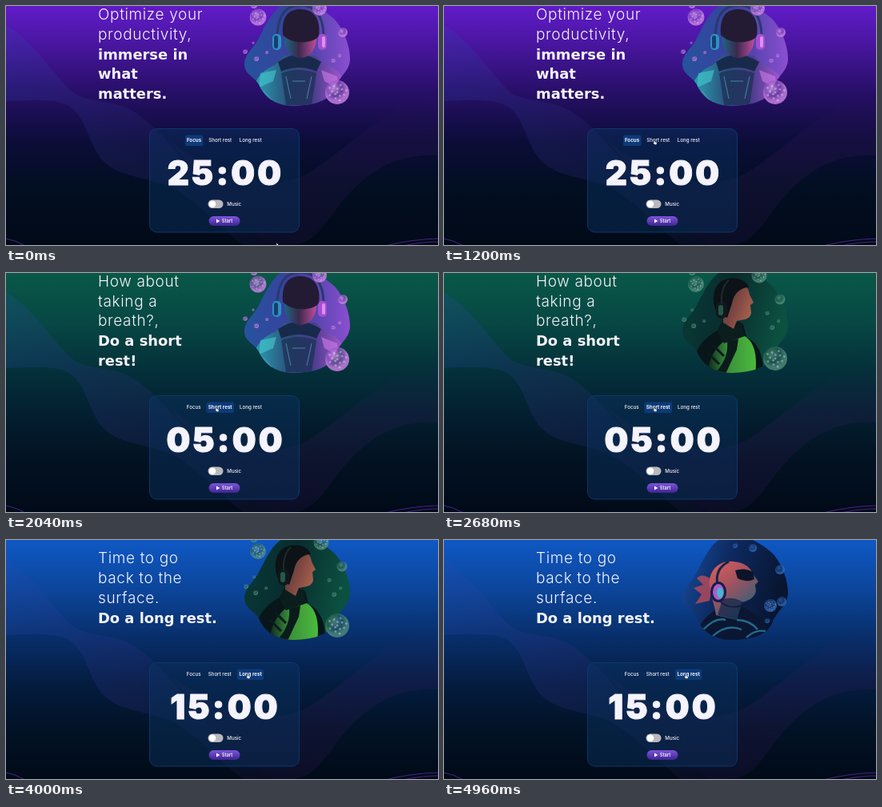
Write an HTML page that moves like this. It is 540 px wide and 299 px high and loops after 5 s.

```html
<!DOCTYPE html>
<html lang="en">
<head>
<meta charset="utf-8">
<title>Focus timer</title>
<style>
  html, body { margin: 0; width: 100%; height: 100%; overflow: hidden; background: #010a18; }
  svg { display: block; width: 540px; height: 299px; }
  text { fill: #f5f3fb; font-family: Inter, sans-serif; font-size: 6.2px; font-weight: 500; }
  .head text { font-size: 19px; font-weight: 300; letter-spacing: .65px; }
  .head .b { font: 700 17.9px "DejaVu Sans", sans-serif; letter-spacing: 0; }
  .mid .time { font: 900 42px Inter, sans-serif; letter-spacing: 3.2px; stroke: #f5f3fb; stroke-width: 1px; }
  .mid { text-anchor: middle; }
  .mid .on { font-weight: 700; }

  /* hard switches between the three modes; pictures follow a little later */
  .focus, .short, .long, .pic1, .pic2, .pic3 { animation: 5s step-end infinite; }
  .focus { animation-name: focus; }
  .short { animation-name: short; }
  .long { animation-name: long; }
  .pic1 { animation-name: pic1; }
  .pic2 { animation-name: pic2; }
  .pic3 { animation-name: pic3; }
  @keyframes focus { 0% { visibility: visible } 36.8%, 100% { visibility: hidden } }
  @keyframes short { 0% { visibility: hidden } 36.8% { visibility: visible } 79.2%, 100% { visibility: hidden } }
  @keyframes long { 0% { visibility: hidden } 79.2%, 100% { visibility: visible } }
  @keyframes pic1 { 0% { visibility: visible } 42.4%, 100% { visibility: hidden } }
  @keyframes pic2 { 0% { visibility: hidden } 42.4% { visibility: visible } 84.8%, 100% { visibility: hidden } }
  @keyframes pic3 { 0% { visibility: hidden } 84.8%, 100% { visibility: visible } }

  .cursor { animation: move 5s infinite ease-in-out; }
  @keyframes move {
    0%, 1% { transform: translate(338px, 296px) }
    12.8%, 15% { transform: translate(257px, 164px) }
    22%, 60% { transform: translate(262px, 168px) }
    68%, 70% { transform: translate(297px, 168px) }
    75%, 100% { transform: translate(301px, 168px) }
  }
  .arrow { animation: arrow 5s step-end infinite; }
  .hand { animation: hand 5s step-end infinite; }
  @keyframes arrow { 0% { visibility: visible } 12% { visibility: hidden } 62% { visibility: visible } 66%, 100% { visibility: hidden } }
  @keyframes hand { 0% { visibility: hidden } 12% { visibility: visible } 62% { visibility: hidden } 66%, 100% { visibility: visible } }
</style>
</head>
<body>
<svg viewBox="0 0 540 299">
  <defs>
    <linearGradient id="purple" x2="0" y2="1">
      <stop stop-color="#611bc8"/><stop offset=".15" stop-color="#4a16a2"/>
      <stop offset=".36" stop-color="#270f67"/><stop offset=".57" stop-color="#0b0d38"/>
      <stop offset=".75" stop-color="#020e22"/><stop offset="1" stop-color="#010a18"/>
    </linearGradient>
    <linearGradient id="green" x2="0" y2="1">
      <stop stop-color="#095848"/><stop offset=".2" stop-color="#074844"/>
      <stop offset=".4" stop-color="#04313b"/><stop offset=".6" stop-color="#031e2f"/>
      <stop offset=".8" stop-color="#021121"/><stop offset="1" stop-color="#010a18"/>
    </linearGradient>
    <linearGradient id="blue" x2="0" y2="1">
      <stop stop-color="#0f58c4"/><stop offset=".2" stop-color="#0c469c"/>
      <stop offset=".4" stop-color="#082f6c"/><stop offset=".6" stop-color="#041c40"/>
      <stop offset=".8" stop-color="#021225"/><stop offset="1" stop-color="#010a18"/>
    </linearGradient>
    <linearGradient id="wave">
      <stop stop-color="#2a4cb0" stop-opacity=".2"/><stop offset=".4" stop-color="#34348c" stop-opacity=".22"/>
      <stop offset="1" stop-color="#3a2a78" stop-opacity=".1"/>
    </linearGradient>
    <linearGradient id="haze" x2="0" y2="1">
      <stop stop-color="#5a1e78" stop-opacity="0"/><stop offset=".4" stop-color="#5a1e78" stop-opacity=".14"/>
      <stop offset="1" stop-color="#401e70" stop-opacity=".16"/>
    </linearGradient>
    <linearGradient id="card" x2="0" y2="1"><stop stop-color="#0a3566" stop-opacity=".42"/><stop offset="1" stop-color="#0a3260" stop-opacity=".45"/></linearGradient>
    <linearGradient id="btn" x2="0" y2="1"><stop stop-color="#7d55dc"/><stop offset="1" stop-color="#3f2492"/></linearGradient>
    <linearGradient id="blob1"><stop stop-color="#25539c"/><stop offset=".5" stop-color="#3c3f9f"/><stop offset="1" stop-color="#8b4fd0"/></linearGradient>
    <linearGradient id="blob2" y2=".2"><stop stop-color="#093a36"/><stop offset=".5" stop-color="#082c2e"/><stop offset="1" stop-color="#0c5040"/></linearGradient>
    <linearGradient id="blob3" y2=".3"><stop stop-color="#174f9f"/><stop offset=".45" stop-color="#0e2a62"/><stop offset="1" stop-color="#081530"/></linearGradient>
    <linearGradient id="jacket"><stop stop-color="#2ba5b4"/><stop offset=".4" stop-color="#2a4c78"/><stop offset=".65" stop-color="#4c3d8e"/><stop offset="1" stop-color="#b25bd8"/></linearGradient>
    <linearGradient id="nape"><stop stop-color="#1f6482"/><stop offset=".45" stop-color="#3a294c"/><stop offset="1" stop-color="#c04c9a"/></linearGradient>
    <linearGradient id="skin2" y2=".6"><stop stop-color="#2a4a34"/><stop offset=".5" stop-color="#7c4540"/><stop offset="1" stop-color="#a8624e"/></linearGradient>
    <linearGradient id="suit2"><stop stop-color="#0e2a20"/><stop offset=".4" stop-color="#3a8f3a"/><stop offset="1" stop-color="#4bbb3c"/></linearGradient>
    <linearGradient id="skin3" x2=".7" y2="1"><stop stop-color="#e0605e"/><stop offset=".45" stop-color="#a4525e"/><stop offset="1" stop-color="#23617c"/></linearGradient>
    <radialGradient id="bub1" cx=".4" cy=".35"><stop stop-color="#d8a0ea" stop-opacity=".75"/><stop offset=".6" stop-color="#9357c8" stop-opacity=".65"/><stop offset="1" stop-color="#c47fe0" stop-opacity=".85"/></radialGradient>
    <radialGradient id="bub2" cx=".4" cy=".35"><stop stop-color="#7fb09c" stop-opacity=".5"/><stop offset=".6" stop-color="#2a6458" stop-opacity=".6"/><stop offset="1" stop-color="#55917f" stop-opacity=".75"/></radialGradient>
    <radialGradient id="bub3" cx=".4" cy=".35"><stop stop-color="#4c86d6" stop-opacity=".5"/><stop offset=".6" stop-color="#174893" stop-opacity=".6"/><stop offset="1" stop-color="#316fc0" stop-opacity=".75"/></radialGradient>
    <path id="blob" d="M298 74C297 62 308 54 314 44C324 26 332 4 350-4C376-10 396 4 411 17C424 32 430 52 430 66C430 82 416 88 410 104C404 121 376 125 358 125C334 124 322 112 316 98C310 88 299 86 298 74Z"/>
    <clipPath id="cut"><use href="#blob"/></clipPath>
  </defs>

  <rect class="focus" width="540" height="299" fill="url(#purple)"/>
  <rect class="short" width="540" height="299" fill="url(#green)"/>
  <rect class="long" width="540" height="299" fill="url(#blue)"/>

  <path fill="url(#wave)" d="M0 24C34 44 58 84 82 107C104 124 140 114 168 138C208 168 236 216 270 246C290 266 306 286 334 299H296C268 278 240 244 206 226C168 212 138 214 118 190C102 168 100 140 80 126C66 116 36 117 0 119Z"/>
  <path fill="url(#haze)" d="M200 165C260 216 330 236 380 208C430 176 480 120 540 112V187C490 184 456 204 424 240C400 268 388 299 356 299H334C306 286 290 266 270 246C246 226 226 192 200 165Z"/>
  <g fill="none" stroke="#5a2aa4" stroke-width=".8">
    <path d="M0 291Q12 293 24 300M474 300Q506 292 540 291M496 300Q520 295 540 295"/>
  </g>

  <g class="pic1">
    <use href="#blob" fill="url(#blob1)"/>
    <g clip-path="url(#cut)">
      <path fill="url(#jacket)" d="M308 124C306 98 316 82 336 74L348 62H388L400 74C420 80 428 98 427 124Z"/>
      <path fill="#182a4c" d="M340 70Q366 52 394 70L388 82Q366 72 344 82Z"/>
      <path fill="#1c3156" fill-opacity=".75" d="M344 84Q366 76 388 84L382 124H350Z"/>
      <path fill="#42c5cd" fill-opacity=".65" d="M318 84L338 80L334 94L316 102Z"/>
      <path fill="#cf7bea" fill-opacity=".6" d="M394 80L414 88L416 104L398 94Z"/>
      <path fill="none" stroke="#67b4d6" stroke-opacity=".6" d="M350 88L356 116M382 88L376 116M358 94H374M322 106L334 120M410 106L398 120"/>
      <ellipse cx="368" cy="41" rx="20" ry="24" fill="url(#nape)"/>
      <path fill="#231b33" d="M346 36C344 12 354 4 368 4C384 4 394 15 391 38C382 48 356 48 346 36Z"/>
    </g>
    <path fill="none" stroke="#29396c" stroke-width="3" d="M339 38C340 8 352-1 368-1C386-1 396 12 397 36"/>
    <rect x="333" y="35" width="11" height="20" rx="5" fill="#2f8fc4"/>
    <rect x="335" y="37" width="5" height="16" rx="2.5" fill="#173e70"/>
    <rect x="390" y="35" width="11" height="20" rx="5" fill="#a24fd0"/>
    <rect x="395" y="38" width="4" height="14" rx="2" fill="#e08cf0"/>
  </g>

  <g class="pic2">
    <use href="#blob" fill="url(#blob2)"/>
    <g clip-path="url(#cut)">
      <path fill="#081619" d="M312 126C310 100 320 84 342 72L350 56L374 64L378 80C394 88 400 106 399 126Z"/>
      <path fill="url(#suit2)" d="M330 126C330 108 340 92 352 84L374 78C388 84 392 104 389 126Z"/>
      <path fill="#0a1c1a" d="M354 86L368 82L366 96L352 126H338Q356 108 354 86Z"/>
      <path fill="none" stroke="#0a1c1a" stroke-width="3" d="M336 90L350 104M330 100L344 114"/>
      <path fill="#0b1d1d" d="M350 56L372 62L376 79L350 88L342 74Z"/>
      <path fill="url(#skin2)" d="M358 14C370 8 381 16 382 27L387 37L383 40L384 50C382 60 372 58 366 60L362 70L349 62V30Z"/>
      <path fill="#0c1216" d="M340 48C332 28 340 8 356 7C368 5 379 10 381 18C370 18 362 26 360 38L354 56Z"/>
    </g>
    <rect x="340" y="36" width="14" height="21" rx="6.5" fill="#11191d"/>
    <rect x="343" y="40" width="6" height="13" rx="3" fill="#24594a"/>
    <path fill="none" stroke="#1b2b2f" stroke-width="2" d="M347 38Q346 18 356 9"/>
  </g>

  <g class="pic3">
    <use href="#blob" fill="url(#blob3)"/>
    <g clip-path="url(#cut)">
      <path fill="#c44c5a" fill-opacity=".75" d="M336 50Q322 40 316 48L324 56L312 60L322 68L314 80L332 76Z"/>
      <path fill="#0b1732" d="M312 126Q318 100 342 86L374 84Q404 98 410 126Z"/>
      <path fill="none" stroke="#2c8fb4" stroke-opacity=".7" stroke-width="2.4" d="M324 112Q340 96 352 100M334 122Q352 104 372 112M366 100Q382 100 392 112M378 122Q388 112 402 114"/>
      <path fill="url(#skin3)" d="M332 58C330 38 344 25 362 27C376 28 384 35 387 44L393 52L389 56L390 64C388 73 380 76 372 78L366 100L340 94C338 80 334 72 332 58Z"/>
      <path fill="#102449" fill-opacity=".7" d="M348 74Q362 70 374 78L366 100L342 94Z"/>
    </g>
    <path fill="#0c1428" d="M364 38Q376 34 386 40L388 49Q378 54 367 48Z"/>
    <path fill="none" stroke="#162446" stroke-width="3" d="M342 56Q338 36 356 27"/>
    <ellipse cx="343" cy="65" rx="10" ry="13" fill="#151d48"/>
    <ellipse cx="343" cy="65" rx="7" ry="10" fill="#ae5cc8"/>
    <ellipse cx="345" cy="66" rx="4" ry="6.5" fill="#42b9cf"/>
    <path fill="none" stroke="#101a36" stroke-width="1.6" d="M345 77Q360 90 382 78"/>
  </g>

  <g class="head focus">
    <text x="115" y="17">Optimize your</text><text x="115" y="41.5">productivity,</text>
    <text class="b" x="115" y="66.5">immerse in</text><text class="b" x="115" y="91.3">what</text><text class="b" x="115" y="116.3">matters.</text>
  </g>
  <g class="head short">
    <text x="115" y="17">How about</text><text x="115" y="41.5">taking a</text><text x="115" y="66.3">breath?,</text>
    <text class="b" x="115" y="91.3">Do a short</text><text class="b" x="115" y="116.3">rest!</text>
  </g>
  <g class="head long">
    <text x="115" y="29.3">Time to go</text><text x="115" y="54">back to the</text><text x="115" y="79">surface.</text>
    <text class="b" x="115" y="104">Do a long rest.</text>
  </g>

  <rect x="179.5" y="153.5" width="187" height="129.5" rx="9" fill="url(#card)" stroke="#0d3a70" stroke-width=".9"/>

  <g class="mid">
    <g class="focus">
      <rect x="224" y="161.5" width="22.5" height="13.5" rx="2.2" fill="#0d3b79"/>
      <text class="on" x="235" y="170.4">Focus</text><text x="267.7" y="170.4">Short rest</text><text x="305.7" y="170.4">Long rest</text>
      <text class="time" x="274.6" y="224">25:00</text>
    </g>
    <g class="short">
      <rect x="250.5" y="161.5" width="34.5" height="13.5" rx="2.2" fill="#0d3b79"/>
      <text x="234.7" y="170.4">Focus</text><text class="on" x="267.7" y="170.4">Short rest</text><text x="305.9" y="170.4">Long rest</text>
      <text class="time" x="274.6" y="224">05:00</text>
    </g>
    <g class="long">
      <rect x="289" y="161.5" width="33" height="13.5" rx="2.2" fill="#0d3b79"/>
      <text x="234.7" y="170.4">Focus</text><text x="267.2" y="170.4">Short rest</text><text class="on" x="305.6" y="170.4">Long rest</text>
      <text class="time" x="274" y="224">15:00</text>
    </g>
  </g>

  <rect x="252.5" y="242.5" width="19" height="10.5" rx="5.25" fill="#b9b9bd"/>
  <circle cx="258" cy="247.7" r="4.3" fill="#fff"/>
  <text x="276.3" y="250">Music</text>
  <rect x="253.5" y="263" width="39" height="12" rx="6" fill="url(#btn)"/>
  <path fill="#fff" d="M263 266.4L267.4 268.9L263 271.4Z"/>
  <text x="269.8" y="271.1" style="font-size:5.7px;font-weight:600">Start</text>

  <g class="cursor" stroke="#0b1020" stroke-width=".5">
    <path class="arrow" fill="#e8e8ee" d="M0 0V5L1.2 4L2 5.6L2.9 5.2L2.1 3.7H3.6Z"/>
    <path class="hand" fill="#fff" d="M1 0Q1.8 0 1.8 .8V2L4 2.5Q4.4 2.7 4.2 3.5L3.6 5.4H1.2L-.6 3.3Q-.4 2.6 .3 3V.8Q.3 0 1 0Z"/>
  </g>
</svg>
<script>
  const NS = "http://www.w3.org/2000/svg";

  function circle(parent, cx, cy, r, fill, opacity = 1) {
    const c = document.createElementNS(NS, "circle");
    const attrs = { cx, cy, r, fill, opacity };
    for (const k in attrs) c.setAttribute(k, attrs[k]);
    parent.append(c);
  }

  function bubble(parent, fill, x, y, r) {
    circle(parent, x, y, r, `url(#${fill})`);
    if (r < 8) return;
    // speckle inside the large ones
    for (let i = 0; i < 14; i++) {
      const a = i * 2.4, d = r * .8 * Math.sqrt(i / 14);
      circle(parent, x + d * Math.cos(a), y + d * Math.sin(a), r * .09, "#fff", .35);
    }
  }

  const sets = {
    pic1: ["bub1", [[315, 14, 10.5], [392, 3, 9], [421, 33, 6], [414, 108, 15], [310, -1, 4], [299, 57, 2.8],
      [313, 66, 3], [326, 58, 2], [309, 46, 1.6], [417, 62, 2.2], [409, 68, 2.6]]],
    pic2: ["bub2", [[315, 14, 10], [394, 3, 9.5], [420, 33, 6.5], [414, 107, 15], [310, -1, 4], [300, 58, 3],
      [312, 66, 3], [310, 46, 2], [325, 60, 2], [404, 50, 2.5], [410, 68, 3], [418, 60, 2]]],
    pic3: ["bub3", [[408, 82, 8], [422, 77, 6], [420, 37, 6], [386, 10, 5], [364, 7, 3], [404, 101, 3]]]
  };
  for (const name in sets) {
    const [fill, list] = sets[name];
    const group = document.querySelector("." + name);
    list.forEach(b => bubble(group, fill, ...b));
  }
</script>
</body>
</html>
```
